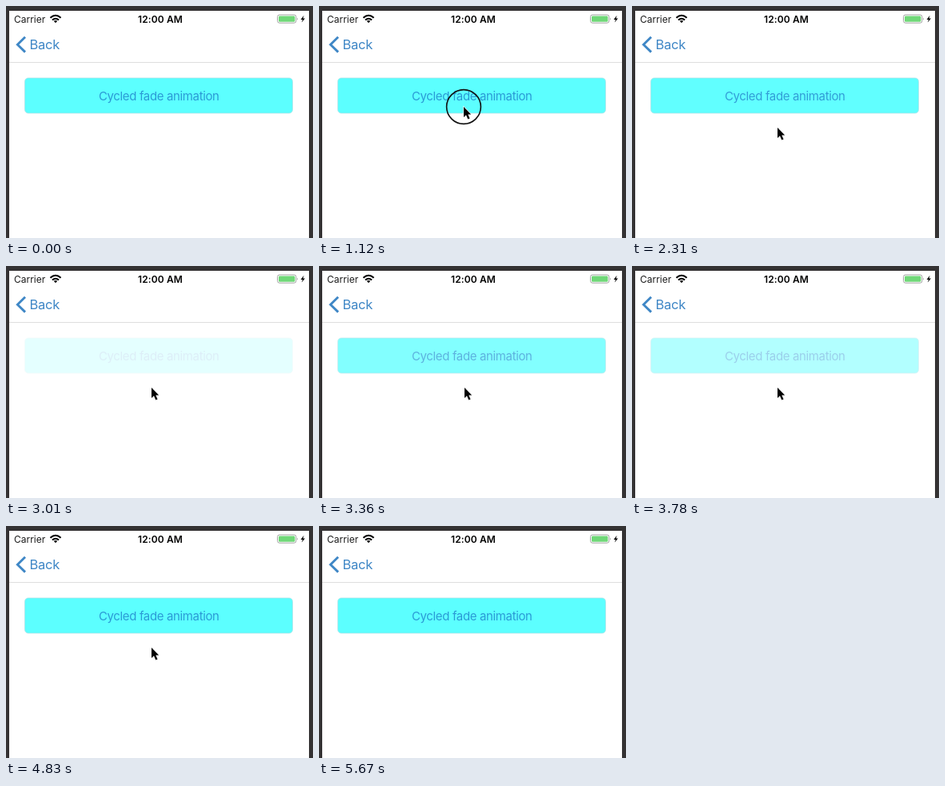
Recreate the animation shown at these times as an HTML page. Size 384 by 290 pixels, loop 5740 ms.

```html
<!DOCTYPE html>
<html lang="en">
<head>
<meta charset="utf-8">
<title>Cycled fade</title>
<style>
  html, body { margin: 0; width: 100%; height: 100%; overflow: hidden; background: #343233; }
  svg { display: block; width: 384px; height: 290px; }
  text { font-family: Inter, Roboto, sans-serif; }
</style>
</head>
<body>
<svg viewBox="0 0 384 290">
  <rect width="384" height="290" fill="#343233"/>
  <rect x="4" y="6" width="375" height="284" fill="#fff"/>
  <rect x="4" y="70" width="375" height="1" fill="#dedede"/>

  <!-- status bar -->
  <text x="10" y="20.7" font-size="12" fill="#1c1c1c">Carrier</text>
  <g fill="none" stroke="#000" stroke-width="2">
    <path d="M55.4 14.8Q62 8.8 68.6 14.8"/>
    <path d="M57.9 17.5Q62 13.9 66.1 17.5"/>
  </g>
  <path d="M59.8 18.8Q62 17 64.2 18.8L62 21.2Z"/>
  <text x="193" y="20.6" font-size="12" font-weight="600" text-anchor="middle" letter-spacing=".1">12:00 AM</text>
  <rect x="339.5" y="11" width="23.4" height="10.2" rx="2.6" fill="#fff" stroke="#a3a3a3"/>
  <rect x="341" y="12.5" width="20.4" height="7.2" rx="1.3" fill="#70d878"/>
  <path d="M364.2 14.4Q366 16.1 364.2 17.8Z" fill="#999"/>
  <path d="M372.6 11.8L368.6 16.9H371L369.8 20.6L374 15.4H371.5Z"/>

  <!-- navigation bar -->
  <path d="M24 38.8L14.4 48.2L24 57.6" fill="none" stroke="#3f87c6" stroke-width="2.9"/>
  <text x="29.6" y="54" font-size="16.5" letter-spacing="-.3" fill="#3f87c6">Back</text>

  <g id="button">
    <rect x="23.5" y="90" width="335" height="44" rx="4.5" fill="#5cffff" stroke="#a9dfe4" stroke-opacity=".7"/>
    <text x="191.3" y="118" font-size="15" letter-spacing="-.36" text-anchor="middle" fill="#2b9ad6">Cycled fade animation</text>
  </g>

  <circle id="ring" r="21.4" fill="none" stroke="#111" stroke-width="1.6"/>
  <path id="arrow" d="M0 0V13L3 10.3L5.3 15.6L7.6 14.6L5.3 9.4H9.2Z" stroke="#fff" stroke-width="1.2" paint-order="stroke"/>
</svg>
<script>
const LOOP = 5740;
const PRESS = [1050, 1225];

// [time, opacity]
const fade = [[0, 1], [1225, 1], [1785, 0], [2330, 1], [2920, 0], [3500, 1], [4025, 0], [4545, 1], [LOOP, 1]];

// [time, x, y] of the pointer tip
const path = [
  [0, 200, 296], [70, 199, 287], [800, 181, 126], [1260, 181, 126],
  [1900, 182, 152], [4900, 182, 152], [5530, 199, 279], [5660, 202, 296], [LOOP, 202, 296]
];

const el = id => document.getElementById(id);
const button = el('button'), ring = el('ring'), arrow = el('arrow');
const linear = p => p;
const smooth = p => p * p * (3 - 2 * p);

function sample(keys, t, ease) {
  let i = 1;
  while (i < keys.length - 1 && keys[i][0] <= t) i++;
  const a = keys[i - 1], b = keys[i];
  const p = ease((t - a[0]) / (b[0] - a[0]));
  return a.slice(1).map((v, k) => v + (b[k + 1] - v) * p);
}

function draw(t) {
  const [x, y] = sample(path, t, t > 4900 ? linear : smooth);
  const place = `translate(${x.toFixed(2)} ${y.toFixed(2)})`;
  arrow.setAttribute('transform', place);
  ring.setAttribute('transform', place);
  ring.style.display = t >= PRESS[0] && t < PRESS[1] ? '' : 'none';
  button.setAttribute('opacity', sample(fade, t, linear)[0].toFixed(3));
}

const start = performance.now();
function tick() {
  draw((performance.now() - start) % LOOP);
  requestAnimationFrame(tick);
}
tick();
</script>
</body>
</html>
```
